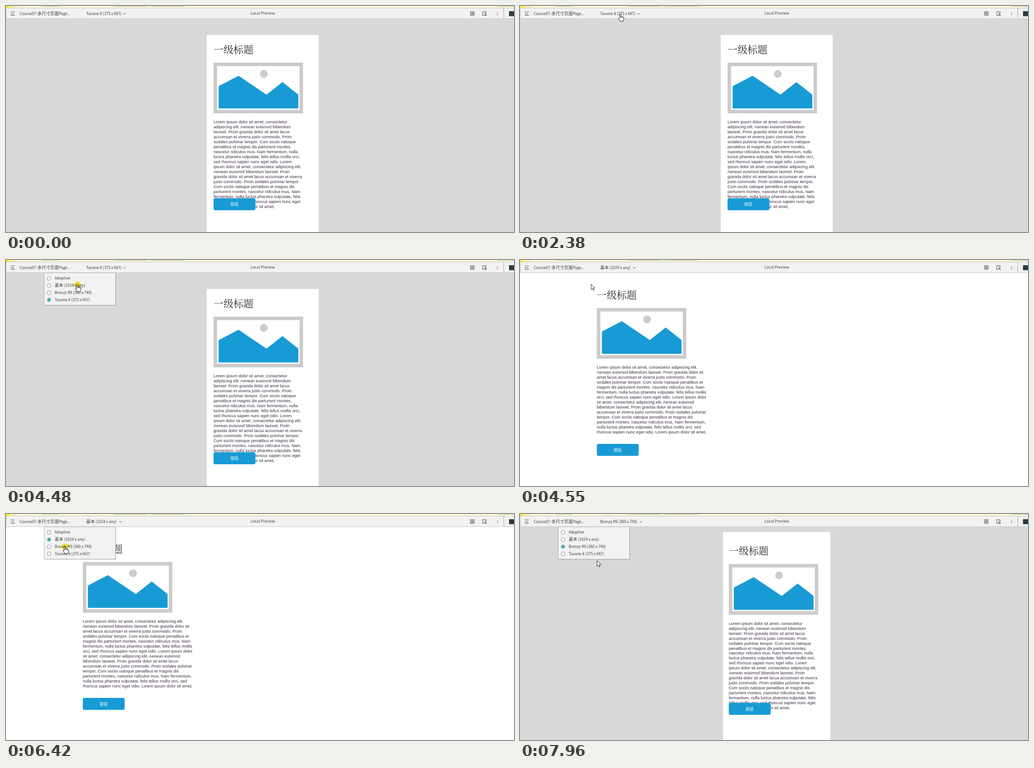
Recreate the animation shown at these times as an HTML page. Size 1121 by 499 pixels, loop 8000 ms.

```html
<!DOCTYPE html>
<html lang="zh">
<head>
<meta charset="utf-8">
<title>Local Preview</title>
<style>
  html, body { margin: 0; width: 100%; height: 100%; overflow: hidden; background: #fff; }
  svg { display: block; width: 100vw; height: 100vh; }
  text { white-space: pre; }
  .ui { font: 8.4px "Noto Sans CJK SC", "Noto Sans CJK", "Open Sans", sans-serif; fill: #3c3c3c; }
  .han { font-size: 9.4px; }
  .title { font: 500 22px "Noto Serif CJK SC", "Noto Serif CJK", "Noto Sans CJK SC", serif; fill: #2b2b2b; }
  .body { font: 9.15px "Liberation Sans", Arial, sans-serif; fill: #3a2c3e; }
  .button { font: 8.8px "Noto Sans CJK SC", "Noto Sans CJK", sans-serif; fill: #fff; text-anchor: middle; }
  .line { fill: none; stroke: #555; stroke-width: 1.1; }
  .cursor { fill: #fff; stroke: #111; stroke-width: .9; stroke-linejoin: round; }
  #halo { fill: #f9ec31; mix-blend-mode: multiply; }
</style>
</head>
<body>
<svg viewBox="0 0 1121 499">
  <rect id="backdrop" y="28" width="1121" height="471" fill="#d8d8d8"/>
  <rect id="card" height="470" fill="#fff"/>

  <g id="content">
    <text class="title" y="-21">一级标题</text>
    <rect width="197.5" height="112" fill="#cbcbcb"/>
    <rect x="7.8" y="7.8" width="182" height="96.4" fill="#fff"/>
    <path d="M11.2 52 55.2 29 116.9 70.7 152 43 187.1 70.7V101.2H11.2Z" fill="#189bd5"/>
    <circle cx="110.9" cy="25" r="8.5" fill="#cbcbcb"/>
    <text id="paragraph" class="body"></text>
  </g>
  <g id="button">
    <rect width="92.4" height="26.5" rx="4" fill="#189bd5"/>
    <text class="button" x="45.7" y="16.8">按钮</text>
  </g>

  <rect width="1121" height="4" fill="#fdf8da"/>
  <rect width="7" height="4" fill="#fff200"/>
  <rect x="7" width="17" height="4" fill="#fbeeb0"/>
  <path d="M80 .4H116M238 .4H312M320 .4H393M1085 .4H1121" stroke="#a5a294" stroke-width=".9"/>
  <rect x=".5" y="4.5" width="1121" height="23.5" fill="#f2f2f2" stroke="#c4c4c4"/>
  <path class="line" d="M10.5 13H19.5M10.5 16.7H17.5M10.5 20.4H19.5"/>
  <text class="ui" x="30" y="19.8">Course07-<tspan class="han">多尺寸页面</tspan>Page...</text>
  <text id="label" class="ui" x="177" y="19.8"></text>
  <path id="chevron" d="M-2.5-1.2 0 1.3 2.5-1.2" fill="none" stroke-width="1.1"/>
  <text class="ui" x="566.5" y="19" text-anchor="middle">Local Preview</text>
  <path class="line" d="M1025 12.5H1033V20.7H1025ZM1026.5 14.7H1031.5M1026.5 16.6H1031.5M1026.5 18.5H1031.5"/>
  <path class="line" d="M1059.5 15.5V12.5H1052V20.7H1055M1061 20.7H1056L1059.5 15.5M1056 15 1060.5 20.5"/>
  <g fill="#555"><circle cx="1084.5" cy="14.2" r=".8"/><circle cx="1084.5" cy="16.8" r=".8"/><circle cx="1084.5" cy="19.4" r=".8"/></g>
  <path d="M1098.5 4V28" stroke="#a2a2a2"/>
  <rect x="1110" y="11.5" width="11" height="11" fill="#2b3a45"/>

  <g id="menu">
    <rect x="85" y="29" width="158" height="72" fill="#000" opacity=".14"/>
    <rect x="84.3" y="28.3" width="157.4" height="71.4" fill="#f2f2f2" stroke="#b2b2b2"/>
    <g id="options"></g>
  </g>

  <circle id="halo" r="7.5"/>
  <path id="arrow" class="cursor" d="M0 0V12.2L2.8 9.6 4.7 14 6.6 13.2 4.8 8.9H8.6Z"/>
  <path id="hand" class="cursor" d="M-1.2 1.4Q0-.6 1.3 1.4V6L6.4 7Q8.6 7.6 8.5 10L7 14.2V17H-.2V15L-3.7 10.8Q-3.6 8.7-1.2 10.6ZM1.3 6V9M3.9 6.6V9.2M6.4 7V9.6"/>
</svg>
<script>
const $ = id => document.getElementById(id);
const han = text => text.replace(/[\u4e00-\u9fff]+/g, '<tspan class="han">$&</tspan>');

const narrow = `Lorem ipsum dolor sit amet, consectetur
adipiscing elit. Aenean euismod bibendum
laoreet. Proin gravida dolor sit amet lacus
accumsan et viverra justo commodo. Proin
sodales pulvinar tempor. Cum sociis natoque
penatibus et magnis dis parturient montes,
nascetur ridiculus mus. Nam fermentum, nulla
luctus pharetra vulputate, felis tellus mollis orci,
sed rhoncus sapien nunc eget odio. Lorem
ipsum dolor sit amet, consectetur adipiscing elit.
Aenean euismod bibendum laoreet. Proin
gravida dolor sit amet lacus accumsan et viverra
justo commodo. Proin sodales pulvinar tempor.
Cum sociis natoque penatibus et magnis dis
parturient montes, nascetur ridiculus mus. Nam
fermentum, nulla luctus pharetra vulputate, felis
tellus mollis orci, sed rhoncus sapien nunc eget
odio. Lorem ipsum dolor sit amet,`;
const wide = `Lorem ipsum dolor sit amet, consectetur adipiscing elit.
Aenean euismod bibendum laoreet. Proin gravida dolor sit
amet lacus accumsan et viverra justo commodo. Proin
sodales pulvinar tempor. Cum sociis natoque penatibus et
magnis dis parturient montes, nascetur ridiculus mus. Nam
fermentum, nulla luctus pharetra vulputate, felis tellus mollis
orci, sed rhoncus sapien nunc eget odio. Lorem ipsum dolor
sit amet, consectetur adipiscing elit. Aenean euismod
bibendum laoreet. Proin gravida dolor sit amet lacus
accumsan et viverra justo commodo. Proin sodales pulvinar
tempor. Cum sociis natoque penatibus et magnis dis
parturient montes, nascetur ridiculus mus. Nam fermentum,
nulla luctus pharetra vulputate, felis tellus mollis orci, sed
rhoncus sapien nunc eget odio. Lorem ipsum dolor sit amet,`;

// Menu entries; x, y place the picture, card is [x, y, width].
const views = [
  { label: 'Adaptive' },
  { label: '基本 (1024 x any)', chevron: 252.5, x: 169.5, y: 106, button: 406, text: wide },
  { label: 'Brenzy R9 (360 x 740)', chevron: 266.5, x: 460.7, y: 110.4, button: 417, text: narrow, card: [448, 39.7, 237] },
  { label: 'Tavone 8 (375 x 667)', chevron: 261.5, x: 458, y: 125, button: 424.5, text: narrow, card: [443, 64, 247] }
];

// Pointer moves: a click takes the last two steps, then opens the menu or picks a view.
const moves = [
  { start: 70, end: 530, steps: 7, x: 391, y: 160, ease: p => p * (2 - p) },
  { start: 1690, end: 2470, steps: 11, x: 221, y: 17, click: 'open' },
  { start: 2760, end: 3150, steps: 6, x: 160, y: 51 },
  { start: 3300, end: 3301, steps: 1, x: 157, y: 53 },
  { start: 4480, end: 4550, steps: 2, x: 157, y: 53, click: 1 },
  { start: 5010, end: 5550, steps: 8, x: 228, y: 14, click: 'open' },
  { start: 5720, end: 6480, steps: 11, x: 129.5, y: 70.5, click: 2 },
  { start: 6800, end: 7490, steps: 10, x: 239, y: 20, click: 'open' },
  { start: 7660, end: 7960, steps: 5, x: 170, y: 103 }
];
const softEase = p => (p + p * p * (3 - 2 * p)) / 2;

function stateAt(time) {
  const state = { x: 1150, y: 555, view: 3, open: false, halo: false };
  for (const { start, end, steps, x, y, click, ease = softEase } of moves) {
    if (time < start) break;
    const gap = (end - start) / Math.max(1, steps - 1);
    const step = Math.min(steps, Math.floor((time - start) / gap + 1e-6) + 1);
    const travel = click ? steps - 2 : steps;
    const p = travel ? ease(Math.min(1, step / travel)) : 1;
    state.x += (x - state.x) * p;
    state.y += (y - state.y) * p;
    state.halo = Boolean(click) && step === steps - 1;
    if (click && step === steps) {
      state.open = click === 'open';
      if (!state.open) state.view = click;
    }
  }
  return state;
}

const place = (id, x, y) => $(id).setAttribute('transform', `translate(${x} ${y})`);
const show = (id, visible) => $(id).style.display = visible ? '' : 'none';

function showView(index) {
  const { label, chevron, x, y, button, text, card } = views[index];
  $('label').innerHTML = han(label);
  place('chevron', chevron, 17);
  place('content', x, y);
  place('button', x, button);
  $('paragraph').innerHTML = text.split('\n')
    .map((line, i) => `<tspan x="0" y="${134.4 + i * 10.95}">${line}</tspan>`).join('');
  show('backdrop', card);
  show('card', card);
  if (card) ['x', 'y', 'width'].forEach((name, i) => $('card').setAttribute(name, card[i]));
  $('options').innerHTML = views.map((view, i) => {
    const cy = 40.7 + i * 15.7, on = i === index;
    return `<circle cx="95" cy="${cy}" r="4.1" fill="#f8f8f8" stroke="${on ? '#23a39b' : '#858585'}" stroke-width=".9"/>`
      + (on ? `<circle cx="95" cy="${cy}" r="2.9" fill="#23a39b"/>` : '')
      + `<text class="ui" x="107.5" y="${cy + 2.7}">${han(view.label)}</text>`;
  }).join('');
}

let shownView;
function draw(now) {
  const { x, y, view, open, halo } = stateAt(now % 8000);
  if (view !== shownView) showView(shownView = view);
  show('menu', open);
  $('chevron').setAttribute('stroke', open ? '#16a9d0' : '#666');
  const overLabel = y > 8 && y < 28 && x > 172 && x < 268;
  const overMenu = open && y >= 28 && y < 100 && x > 84 && x < 242;
  const pointing = overLabel || overMenu;
  show('hand', pointing);
  show('arrow', !pointing);
  show('halo', halo);
  place('hand', x, y);
  place('arrow', x, y);
  place('halo', x + 1, y + 2);
}

const begin = performance.now();
function tick() {
  draw(performance.now() - begin);
  requestAnimationFrame(tick);
}
tick();
</script>
</body>
</html>
```
